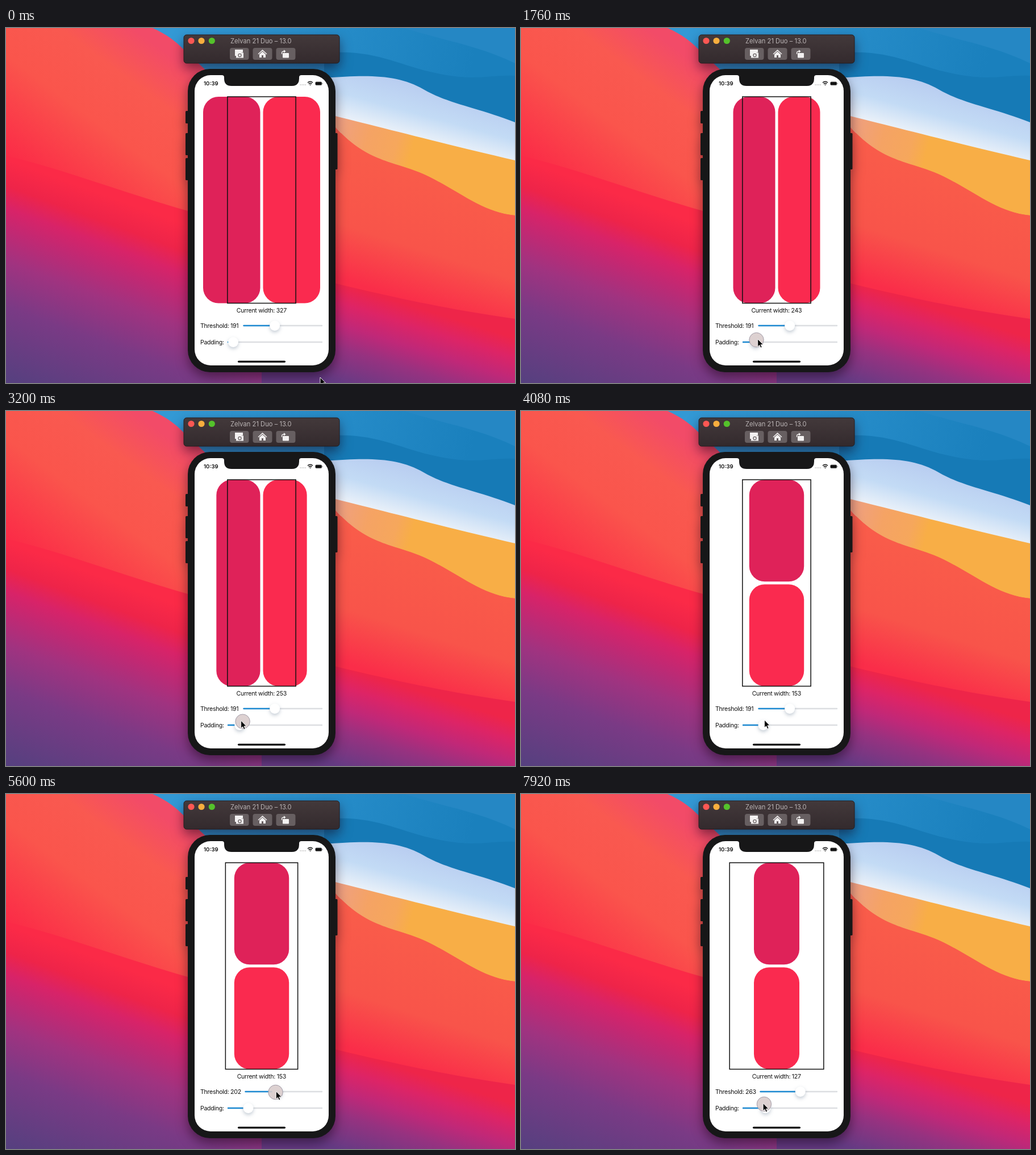
These frames come from a looping animation (896x625 px, 8 s). An HTML page:

```html
<!DOCTYPE html>
<html lang="en">
<head>
<meta charset="utf-8">
<title>Adaptive stack</title>
<style>
html, body { margin: 0; width: 100%; height: 100%; overflow: hidden; }
svg { display: block; width: 896px; height: 625px; }
text { font: 10.6px Inter, "Liberation Sans", sans-serif; letter-spacing: -.3px; fill: #111; white-space: pre; }
.title { font-size: 11.2px; letter-spacing: 0; fill: #bab4b5; }
.clock { font-size: 9.6px; font-weight: 600; letter-spacing: 0; }
.shadow { filter: drop-shadow(0 9px 10px rgba(20, 0, 20, .5)); }
.rail { fill: none; stroke: #dcdee1; stroke-width: 2.4; stroke-linecap: round; }
.fill { fill: none; stroke: #1d8ad2; stroke-width: 2.4; stroke-linecap: round; }
.knob { fill: #fff; filter: drop-shadow(0 3px 3px rgba(40, 70, 100, .28)); }
</style>
</head>
<body>
<svg viewBox="0 0 896 625">
  <defs>
    <linearGradient id="warm" gradientUnits="userSpaceOnUse" x1="5" y1="225" x2="190" y2="-25">
      <stop stop-color="#fb2c47"/><stop offset=".45" stop-color="#fa554c"/>
      <stop offset=".75" stop-color="#f95950"/><stop offset="1" stop-color="#f24b68"/>
    </linearGradient>
    <linearGradient id="dusk" gradientUnits="userSpaceOnUse" x1="0" y1="230" x2="-128" y2="578">
      <stop stop-color="#fb2a47"/><stop offset=".12" stop-color="#ee2449"/>
      <stop offset=".22" stop-color="#d82368"/><stop offset=".31" stop-color="#c32872"/>
      <stop offset=".46" stop-color="#a03380"/><stop offset=".66" stop-color="#7a3a85"/>
      <stop offset="1" stop-color="#55407f"/>
    </linearGradient>
    <linearGradient id="coral" gradientUnits="userSpaceOnUse" x1="700" y1="235" x2="630" y2="455">
      <stop stop-color="#f95c4a"/><stop offset=".6" stop-color="#f8544a"/><stop offset="1" stop-color="#fa2d49"/>
    </linearGradient>
    <linearGradient id="plum" gradientUnits="userSpaceOnUse" x1="590" y1="450" x2="540" y2="610">
      <stop stop-color="#ee2549"/><stop offset=".2" stop-color="#dd2466"/>
      <stop offset=".42" stop-color="#c02878"/><stop offset=".65" stop-color="#963280"/>
      <stop offset="1" stop-color="#653b84"/>
    </linearGradient>
    <linearGradient id="sea" gradientUnits="userSpaceOnUse" x1="300" y1="0" x2="800" y2="140">
      <stop stop-color="#3399d5"/><stop offset="1" stop-color="#1a80bd"/>
    </linearGradient>
    <linearGradient id="foam" gradientUnits="userSpaceOnUse" x1="760" y1="105" x2="732" y2="208">
      <stop stop-color="#b8ccf0"/><stop offset=".5" stop-color="#c3dbf5"/><stop offset="1" stop-color="#f5f7fa"/>
    </linearGradient>
    <linearGradient id="amber" gradientUnits="userSpaceOnUse" x1="585" y1="180" x2="715" y2="215">
      <stop stop-color="#efa080"/><stop offset=".4" stop-color="#f5a364"/>
      <stop offset=".78" stop-color="#f6a75c"/><stop offset="1" stop-color="#f8ae46"/>
    </linearGradient>
    <linearGradient id="bar" x2="0" y2="1">
      <stop stop-color="#43393b"/><stop offset="1" stop-color="#332a2d"/>
    </linearGradient>
  </defs>

  <!-- wallpaper -->
  <rect width="450" height="400" fill="url(#warm)"/>
  <path d="M0 225C100 248 200 288 320 322H450V625H0Z" fill="url(#dusk)"/>
  <rect x="450" width="446" height="625" fill="url(#coral)"/>
  <path d="M450 420C600 452 700 484 896 512V625H450Z" fill="url(#plum)"/>
  <path d="M258 0C285 12 300 25 312 37L360 82V180H896V0Z" fill="url(#sea)"/>
  <path d="M560 44C650 36 690 66 760 80S850 82 896 84V175H560Z" fill="#167ab6"/>
  <path d="M700 0C770 22 830 30 896 62V0Z" fill="#2587c4"/>
  <path d="M560 88C640 82 690 82 735 108S830 140 896 166V236L560 180Z" fill="url(#foam)"/>
  <path d="M560 150C640 170 760 201 896 233V330C840 325 800 290 745 262S640 240 583 178L560 160Z" fill="url(#amber)"/>
  <path d="M560 155L583 178C640 240 690 235 745 262S840 325 896 330V400H560Z" fill="url(#coral)"/>

  <!-- window bar -->
  <g class="shadow">
    <rect x="313" y="12" width="274" height="50" rx="5" fill="url(#bar)" stroke="#241d1f"/>
  </g>
  <circle cx="326" cy="22.5" r="5.6" fill="#fc5753"/>
  <circle cx="344" cy="22.5" r="5.6" fill="#f8ae3e"/>
  <circle cx="362.3" cy="22.5" r="5.6" fill="#54c22b"/>
  <text class="title" x="395" y="27">Zelvan 21 Duo – 13.0</text>
  <g fill="#675f61">
    <rect x="394" y="35" width="33.500" height="21" rx="4"/>
    <rect x="434.500" y="35" width="34" height="21" rx="4"/>
    <rect x="475.500" y="35" width="34" height="21" rx="4"/>
  </g>
  <g fill="#f3f1f1">
    <path d="M403 38h14v5h-9v6h-5z"/>
    <path d="M405 43.500h3l1-1.500h5l1 1.500h3v9h-13z"/>
    <circle cx="411.500" cy="48" r="2.600" fill="none" stroke="#675f61" stroke-width="1.200"/>
    <path d="M443.500 45.500L451.500 38l8 7.500-1 1-7-6.300-7 6.300zM446 46.500l5.500-5 5.500 5V52h-4v-4h-3v4h-4z"/>
    <rect x="487" y="44" width="11" height="8.500" rx="1"/>
    <path d="M485.500 46v-2q0-3 4-3" fill="none" stroke="#f3f1f1" stroke-width="1.300"/>
    <path d="M489 38.300l3.500 2.700-3.500 2.700z"/>
  </g>

  <!-- phone -->
  <g class="shadow" fill="#171718">
    <rect x="316" y="146" width="6" height="22" rx="1.500"/>
    <rect x="316" y="185" width="6" height="39" rx="1.500"/>
    <rect x="316" y="229" width="6" height="39" rx="1.500"/>
    <rect x="577" y="185" width="6.500" height="64" rx="1.500"/>
    <rect x="320" y="72" width="260" height="534" rx="39"/>
  </g>
  <rect x="332" y="83" width="236" height="511" rx="28" fill="#fff"/>
  <path d="M380 83q4 0 4 4v2q0 13 13 13h106q13 0 13-13v-2q0-4 4-4z" fill="#171718"/>
  <text class="clock" x="348" y="101">10:39</text>
  <path d="M517.500 100H528" stroke="#b5b5b5" stroke-width="1.500" stroke-dasharray="1.500 1.500"/>
  <g fill="none" stroke="#111" stroke-width="1.500">
    <path d="M531 96.300q4.500-4 9 0M532.800 98.400q2.700-2.400 5.400 0"/>
    <path d="M535.500 99.300v1.700"/>
  </g>
  <rect x="544.500" y="94.800" width="11.500" height="6" rx="1.800" fill="#111" stroke="#999" stroke-width=".6"/>
  <path d="M557.200 96.800v2" stroke="#888"/>
  <rect x="408" y="585.700" width="84" height="3.200" rx="1.600" fill="#000"/>

  <!-- app -->
  <rect id="first" y="121" rx="27" fill="#df2259"/>
  <rect id="second" rx="27" fill="#fa2a4f"/>
  <rect id="frame" y="121" height="363.500" fill="none" stroke="#111" stroke-width="1.500"/>
  <text id="width" x="449.800" y="501" text-anchor="middle"></text>
  <text id="limit" x="342" y="528"></text>
  <text x="342" y="556.500">Padding:</text>
  <path id="limitRail" class="rail"/><path id="limitFill" class="fill"/>
  <circle id="limitKnob" class="knob" cy="524" r="9"/>
  <path id="padRail" class="rail"/><path id="padFill" class="fill"/>
  <circle id="padKnob" class="knob" cy="553" r="9"/>
  <circle id="touch" r="12.700" fill="#d9cccc" fill-opacity=".9" stroke="#a29ca8"/>
  <path id="cursor" d="M0 0V13.500L3.100 10.700 5.200 15.500 7.500 14.500 5.400 9.800H9.600Z" fill="#000" stroke="#fff" stroke-width=".9"/>
</svg>
<script>
const LOOP = 8000, STEP = 80, SCALE = 0.63, MID = 450, TOP = 121, HEIGHT = 363.5, GAP = 5;
const el = id => document.getElementById(id);
const set = (id, attrs) => {
  for (const key in attrs) el(id).setAttribute(key, attrs[key]);
};

// [time, value] pairs, eased between neighbours
const widthKeys = [[1210, 327], [2326, 155], [2600, 155], [3331, 262], [3850, 153],
  [7050, 153], [7480, 112], [8300, 139]];
const limitKeys = [[5430, 191], [6130, 263]];
const xKeys = [[0, 553], [800, 403], [1210, 403], [2326, 431], [2600, 431], [3331, 412],
  [3850, 428.5], [4150, 428.5], [4800, 473], [5430, 473], [6130, 489], [6300, 489],
  [6990, 427], [7050, 427], [7480, 430], [8300, 423]];
const yKeys = [[0, 615], [800, 549], [2326, 547], [3331, 545], [4150, 544], [4800, 524],
  [6450, 523], [6990, 546], [8300, 544]];
const presses = [[960, 3930], [5000, 6220], [7020, LOOP]];

function at(keys, t) {
  const i = keys.findIndex(key => key[0] > t);
  if (i < 0) return keys[keys.length - 1][1];
  if (i === 0) return keys[0][1];
  const [t0, a] = keys[i - 1], [t1, b] = keys[i];
  const f = (t - t0) / (t1 - t0);
  return a + (b - a) * f * f * (3 - 2 * f);
}

function slider(name, start, y, fraction) {
  const knob = start + 10 + (537 - start) * fraction;
  set(name + 'Rail', { d: `M${start + 1} ${y}H556` });
  set(name + 'Fill', { d: `M${start + 1} ${y}H${knob}` });
  set(name + 'Knob', { cx: knob });
}

function draw(t) {
  const width = at(widthKeys, t), limit = Math.round(at(limitKeys, t));
  const w = width * SCALE, left = MID - w / 2;
  const stacked = width < limit;
  const bw = stacked ? w : (w - GAP) / 2;
  const bh = stacked ? (HEIGHT - GAP) / 2 : HEIGHT;
  set('first', { x: left, width: bw, height: bh });
  set('second', {
    x: stacked ? left : left + bw + GAP,
    y: stacked ? TOP + bh + GAP : TOP,
    width: bw, height: bh
  });
  set('frame', { x: MID - limit * SCALE / 2, width: limit * SCALE });

  el('width').textContent = 'Current width: ' + Math.round(width);
  el('limit').textContent = 'Threshold: ' + limit;
  const ones = String(limit).split('1').length - 1;
  slider('limit', 420.5 - 1.5 * ones, 524, limit / 500);
  slider('pad', 390, 553, (327 - width) / 965);

  set('cursor', { transform: `translate(${at(xKeys, t)} ${at(yKeys, t)})` });
  const down = presses.some(([from, to]) => t >= from && t < to);
  set('touch', {
    cx: at(xKeys, t - 80) + 0.8, cy: at(yKeys, t) + 1.5,
    visibility: down ? 'visible' : 'hidden'
  });
}

const begin = performance.now();
function tick() {
  const t = (performance.now() - begin) % LOOP;
  draw(Math.floor(t / STEP) * STEP);
  requestAnimationFrame(tick);
}
tick();
</script>
</body>
</html>
```
